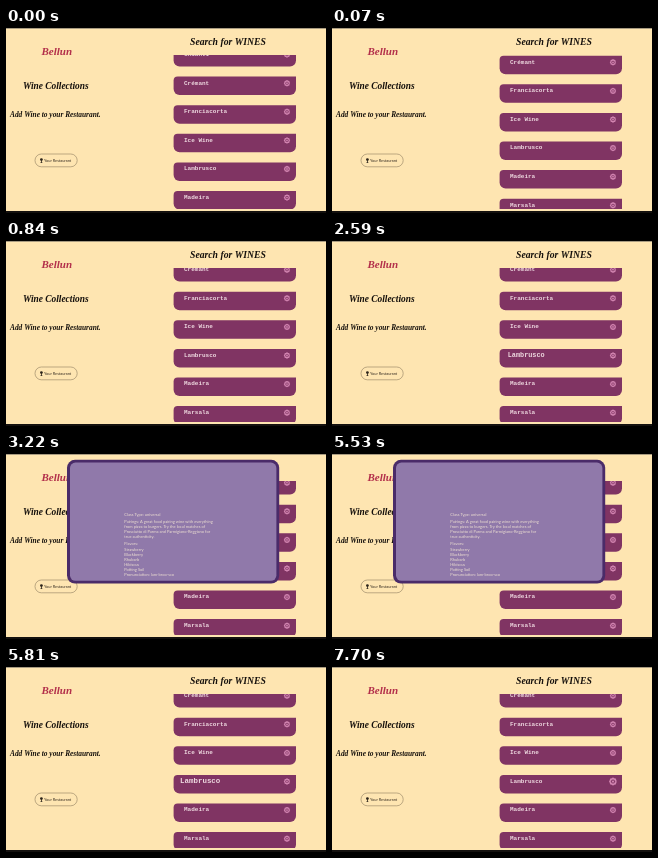
An HTML page with a canvas for the animation above (8000 ms loop, 320 px wide and 185 px high).

```html
<!DOCTYPE html>
<html lang="en">
<head>
<meta charset="utf-8">
<title>Wine list</title>
<style>
  html, body { margin: 0; width: 100%; height: 100%; overflow: hidden; background: #fee5b1; }
  canvas { display: block; width: 320px; height: 185px; }
</style>
</head>
<body>
<canvas id="stage"></canvas>
<script>
const W = 320, H = 185, LOOP = 8000, STEP = 70;
const SCRIPT = '"Liberation Serif", serif';
const TYPE = '"Liberation Mono", monospace';
const SANS = 'Lato, sans-serif';
const INK = '#15100c', PINK = '#d184b0';
const WINES = ['Chianti', 'Crémant', 'Franciacorta', 'Ice Wine', 'Lambrusco', 'Madeira', 'Marsala'];
const DETAILS = [
  [62.4, 'Class Type: universal'],
  [69.4, 'Pairings: A great food pairing wine with everything'],
  [74.4, 'from pizza to burgers. Try the local matches of'],
  [79.4, 'Prosciutto di Parma and Parmigiano-Reggiano for'],
  [84.4, 'true authenticity.'],
  [90.9, 'Flavors:'],
  [97, 'Strawberry'],
  [102, 'Blackberry'],
  [107, 'Rhubarb'],
  [112, 'Hibiscus'],
  [117, 'Potting Soil'],
  [122.4, 'Pronunciation: lam-broo-sco']
];

const canvas = document.getElementById('stage');
const ctx = canvas.getContext('2d');
const ratio = window.devicePixelRatio || 1;
canvas.width = Math.round(W * ratio);
canvas.height = Math.round(H * ratio);

const ramp = (t, from, to) => Math.min(1, Math.max(0, (t - from) / (to - from)));

function text(str, x, y, font, color) {
  ctx.font = font;
  ctx.fillStyle = color;
  ctx.fillText(str, x, y);
}

function box(x, y, w, h, radius, fill, stroke, line) {
  ctx.beginPath();
  ctx.roundRect(x, y, w, h, radius);
  if (fill) { ctx.fillStyle = fill; ctx.fill(); }
  if (stroke) { ctx.strokeStyle = stroke; ctx.lineWidth = line; ctx.stroke(); }
}

function zoomed(x, y, zoom, paint) {
  ctx.save();
  ctx.translate(x, y);
  ctx.scale(zoom, zoom);
  paint();
  ctx.restore();
}

function gear() {
  ctx.strokeStyle = ctx.fillStyle = PINK;
  ctx.lineWidth = 1.2;
  ctx.beginPath();
  for (let i = 0; i <= 64; i++) {
    const a = i / 64 * Math.PI * 2;
    const r = 2.3 + 0.25 * Math.cos(a * 8);
    ctx.lineTo(r * Math.cos(a), r * Math.sin(a));
  }
  ctx.stroke();
  ctx.beginPath();
  ctx.arc(0, 0, 0.9, 0, Math.PI * 2);
  ctx.fill();
}

function card(name, top, nameZoom, gearZoom) {
  box(167.6, top, 122.4, 18.5, [4, 0, 6, 6], '#803463');
  const half = name.length * 1.8;
  zoomed(178 + half, top + 6, nameZoom, () => {
    text(name, -half, 1.9, 'bold 6px ' + TYPE, '#eed9e0');
  });
  zoomed(281, top + 6.6, gearZoom, gear);
}

function leftPanel() {
  text('Bellun', 35.5, 26.8, 'italic bold 11px ' + SCRIPT, '#b3304b');
  text('Wine Collections', 17, 61.3, 'italic bold 9.4px ' + SCRIPT, INK);
  text('Add Wine to your Restaurant.', 4, 88.8, 'italic bold 7.4px ' + SCRIPT, INK);
  box(29, 126, 42.2, 12.8, 6.4, null, '#a08d6c', 0.7);
  // wine glass
  ctx.fillStyle = '#2c241b';
  ctx.beginPath();
  ctx.arc(35.4, 131.6, 1.4, 0, Math.PI * 2);
  ctx.fill();
  ctx.fillRect(35, 132.5, 0.8, 2.4);
  ctx.fillRect(34.4, 134.4, 2, 0.6);
  text('Your Restaurant', 38, 133.8, '3.9px ' + SANS, '#3a3024');
}

function list(t) {
  const scroll = 26.5 * Math.exp(-t / 45);
  const nameZoom = 1 + 0.24 * (ramp(t, 2520, 2640) - ramp(t, 6510, 6720));
  const gearZoom = 1 + 0.25 * ramp(t, 7210, 7420);
  ctx.save();
  ctx.beginPath();
  ctx.rect(160, 27, 140, 154);
  ctx.clip();
  WINES.forEach((name, i) => {
    const active = name === 'Lambrusco';
    card(name, -6.5 + i * 28.6 + scroll, active ? nameZoom : 1, active ? gearZoom : 1);
  });
  ctx.restore();
}

function modal(t) {
  const alpha = ramp(t, 2590, 2870) - ramp(t, 5530, 5810);
  if (!alpha) return;
  ctx.save();
  ctx.globalAlpha = alpha;
  box(61, 5.8, 212.2, 123.8, 8, '#4a2b69');
  box(64, 8.6, 206.4, 118.2, 5.5, '#9079aa');
  ctx.beginPath();
  ctx.rect(64, 8.6, 206.4, 118.2);
  ctx.clip();
  for (const [y, line] of DETAILS) text(line, 118.3, y, '4px ' + SANS, '#eee0d2');
  ctx.restore();
}

function draw(t) {
  ctx.setTransform(canvas.width / W, 0, 0, canvas.height / H, 0, 0);
  ctx.fillStyle = '#fee5b1';
  ctx.fillRect(0, 0, W, H);
  leftPanel();
  text('Search for WINES', 184, 17.3, 'italic bold 9.7px ' + SCRIPT, INK);
  list(t);
  modal(t);
  ctx.fillStyle = '#a99c82';
  ctx.fillRect(0, 0, W, 1);
  ctx.fillStyle = '#14110f';
  ctx.fillRect(0, 183, W, 2);
}

const start = performance.now();
function tick() {
  const t = (performance.now() - start) % LOOP;
  draw(Math.floor(t / STEP) * STEP);
  requestAnimationFrame(tick);
}
tick();
</script>
</body>
</html>
```
